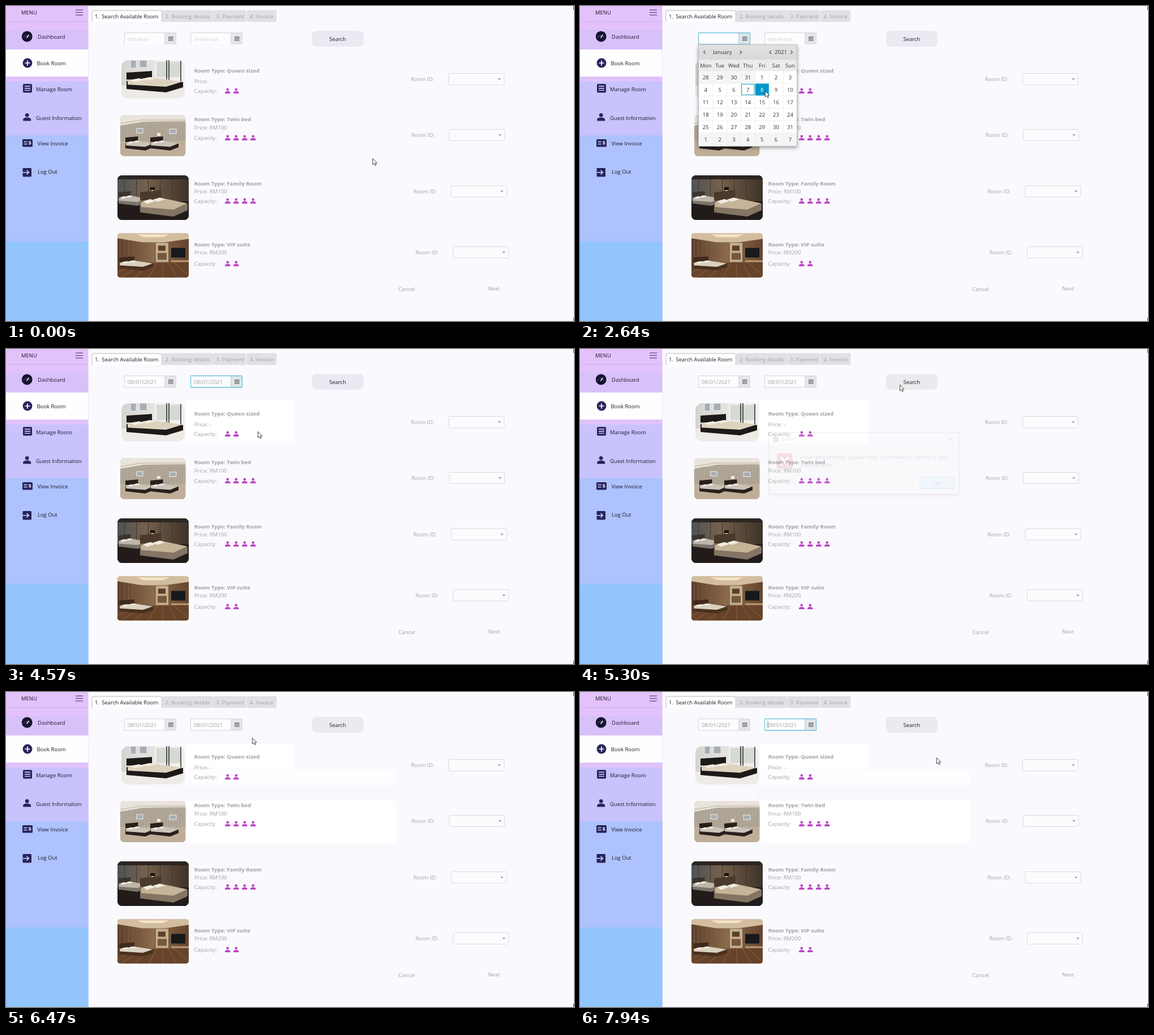
An HTML page for the animation above (8000 ms loop, 1004 by 558 pixels).

```html
<!DOCTYPE html>
<html lang="en">
<head>
<meta charset="utf-8">
<title>Room booking</title>
<style>
html, body { margin: 0; width: 100%; height: 100%; overflow: hidden; background: #fafafe; }
svg { display: block; width: 1004px; height: 558px; }
text { font: 9.55px "Open Sans", "Noto Sans", sans-serif; fill: #a2a2a5; white-space: pre; }
.b { font-weight: 700; }
.dark { fill: #1d1b2c; font-size: 9.45px; }
.cal { fill: #333; text-anchor: middle; }
.mid { text-anchor: middle; }
.date { font-size: 9.75px; }
.hint { fill: #cfcfd4; }
</style>
</head>
<body>
<svg id="stage" viewBox="0 0 1004 558">
  <defs>
    <linearGradient id="day"><stop stop-color="#d6d3d0"/><stop offset="1" stop-color="#f3f3f2"/></linearGradient>
    <linearGradient id="dusk"><stop stop-color="#4d535b"/><stop offset=".4" stop-color="#75604b"/><stop offset="1" stop-color="#3f3229"/></linearGradient>
    <linearGradient id="wood"><stop stop-color="#5b3f2b"/><stop offset=".5" stop-color="#8b6b4c"/><stop offset="1" stop-color="#65452d"/></linearGradient>
    <linearGradient id="head" x2="0" y2="1"><stop stop-color="#e2e2e2"/><stop offset="1" stop-color="#d8d8d8"/></linearGradient>
    <linearGradient id="okFill" x2="0" y2="1"><stop stop-color="#cdeaf5"/><stop offset="1" stop-color="#a5d8ea"/></linearGradient>
    <filter id="shade" x="-10%" y="-10%" width="120%" height="125%">
      <feDropShadow dx="0" dy="3" stdDeviation="3.200" flood-opacity=".36"/>
    </filter>
    <g id="person"><circle cy="-2.600" r="2.300"/><path d="M-4.800 4.500V3C-4.800 .8 -1.500 .4 0 .4S4.800 .8 4.800 3V4.500Z"/></g>
  </defs>
</svg>
<script>
const stage = document.getElementById('stage');
const R = (x, y, w, h, fill, more = '') => `<rect x="${x}" y="${y}" width="${w}" height="${h}" fill="${fill}" ${more}/>`;
const T = (x, y, s, cls = '', more = '') => `<text x="${x}" y="${y}" class="${cls}" ${more}>${s}</text>`;
const D = (d, stroke, w = 1, more = '') => `<path d="${d}" fill="none" stroke="${stroke}" stroke-width="${w}" ${more}/>`;
const F = (d, fill) => `<path d="${d}" fill="${fill}"/>`;
const G = (id, body) => `<g id="${id}">${body}</g>`;
const range = n => [...Array(n).keys()];
const repeat = (n, draw) => range(n).map(draw).join('');

function sidebar() {
  const ink = '#28245c';
  const bands = [[0, '#e3c2fc'], [42, '#d8c0f9'], [77, '#fefeff'], [125, '#e0c3fb'], [134, '#c8c2fd'], [229, '#aec2fd'], [417, '#93c5fd']];
  const items = [[56, 58, 'Dashboard'], [54.5, 104.5, 'Book Room'], [53, 150.5, 'Manage Room'],
    [53, 201.5, 'Guest Information'], [55.5, 246.5, 'View Invoice'], [56, 297, 'Log Out']];
  return bands.map(([y, c]) => R(0, y, 145.5, 558 - y, c)).join('')
    + R(0, 27, 145.5, 1, '#cdb0e6')
    + T(27, 15, 'MENU', 'dark')
    + repeat(3, i => R(123, 6.4 + i * 4.5, 13, 1.2, '#51446f'))
    + items.map(([x, y, s]) => T(x, y, s, 'dark')).join('')
    + `<circle cx="37.200" cy="54" r="9.400" fill="#14122f"/>`
    + D('M31.500 56A6 6 0 0 1 42.800 56', '#e6daf8', 1, 'stroke-dasharray="1.200 1.800"')
    + D('M36.500 56.500L40.500 51', '#fff', 1.4)
    + `<circle cx="38" cy="101" r="8.400" fill="${ink}"/>` + D('M33.500 101H42.500M38 96.500V105.500', '#fff', 1.7)
    + R(30, 138, 16, 15.5, ink, 'rx="2"') + D('M33 142H43M33 145.700H43M33 149.400H43', '#e4dcff', 1.4)
    + `<use href="#person" transform="translate(37.200 197) scale(1.450)" fill="${ink}"/>`
    + R(29, 236, 18, 13.5, ink, 'rx="1.500"') + D('M31.500 240.500H37.500M31.500 244.500H37.500', '#cdd6ff', 1.5)
    + T(42.3, 246.3, '$', 'mid b', 'style="fill:#dfe4ff"')
    + R(29.5, 287, 15.5, 15.5, ink, 'rx="1.500"') + D('M29.500 294.700H40M36.500 291L40.300 294.700L36.500 298.500', '#c9d5ff', 1.6);
}

function tabs() {
  const idle = [[277, 88, '2. Booking details'], [366.5, 57.5, '3. Payment'], [426, 51.5, '4. Invoice']];
  return idle.map(([x, w, s]) => R(x, 8, w, 19.5, '#e1e1e5', 'stroke="#d5d5d9" stroke-width=".7" rx="1.500"') + T(x + 4.8, 21.5, s)).join('')
    + `<path d="M152 28V10Q152 8 154 8H273.500Q275.500 8 275.500 10V28" fill="#fff" stroke="#b9b9bd"/>`
    + T(157, 21.5, '1.', 'dark') + T(169.3, 21.5, 'Search Available Room', 'dark');
}

// One bed shape, headboard at the left, reused in every room picture
const bed = (x, y, sx, sy, frame, sheet, head = frame) => `<g transform="translate(${x} ${y}) scale(${sx} ${sy})">`
  + F('M0 4L45 0V20H0Z', head) + F('M0 24L45 16L100 26V38L70 50L0 42Z', frame)
  + F('M2 23L45 15L99 25L70 37L2 32Z', sheet)
  + F('M6 21L22 17L32 21L14 26ZM27 18L42 14L52 18L36 22Z', '#f1ebe0') + '</g>';
const framed = (x, y, w, h) => R(x, y, w, h, '#a7adb6', 'stroke="#f4f2ee"');

const queen = (w, h) => R(0, 0, w, h, 'url(#day)') + R(0, 45, w, h, '#eeeae5')
  + R(59, 0, 53, 44, '#eff0ee') + R(62, 3, 42, 27, '#d5dad2')
  + framed(16, 0, 10, 14) + framed(32, 0, 13, 13)
  + D('M80 0V34M84 0V35M105 0V40', '#2b2626', 1.5)
  + bed(9, 19, 1, .76, '#1c1918', '#ddd2bd');

const twin = (w, h) => R(0, 0, w, h, '#b0a799') + repeat(24, i => R(i * 5, 16, 1, 30, '#a69c8d'))
  + F(`M0 0H${w}V11L40 12L0 19Z`, '#e9e4db') + D(`M0 15L38 9H${w}`, '#cabfad', 1.5)
  + R(0, 46, w, h, '#bfae97') + framed(29, 24, 11, 8) + framed(87, 25, 12, 8)
  + R(65, 32, 6, 5, '#f5ead0') + R(64, 40, 8, 11, '#3c2920')
  + [9, 53].map(x => bed(x, 38, .5, .5, '#2a1f1c', '#c9c3ba')).join('');

const family = (w, h) => R(0, 0, w, h, 'url(#dusk)') + repeat(6, i => R(12 + i * 21, 0, 1, 40, '#40352b'))
  + R(0, 0, w, 7, '#2c2521') + R(0, 46, w, h, '#211c1a')
  + bed(2, 28, .48, .52, '#7c746a', '#bfb6a9', '#3a342f')
  + R(58, 21, 8, 5, '#17120f') + R(60, 26, 4, 3, '#ffda91')
  + bed(40, 26, .84, .94, '#837463', '#c6b498', '#4a3a2c');

const suite = (w, h) => R(0, 0, w, h, 'url(#wood)') + repeat(7, i => R(4 + i * 7.5, 13, 1, 30, '#7d5b3f'))
  + F(`M0 0H${w}V10L84 16H44L0 9Z`, '#d2bd9e') + F('M34 2H92L80 7H46Z', '#f3e4c6')
  + R(68, 17, 22, 34, '#c3ae90') + R(72, 22, 13, 9, '#5a4029') + R(71, 35, 16, 12, '#76573b')
  + R(95, 26, 25, 17, '#17191b') + R(0, 52, w, h, '#66432a')
  + repeat(7, i => D(`M${i * 25 - 20} ${h}L${40 + i * 10} 52`, '#855b39', 1.2))
  + R(95, 48, 31, 3, '#bd9c73') + bed(3, 41, .6, .5, '#49301f', '#dbd1c0', '#3f2a1d');

const rooms = [
  { name: 'Queen sized', price: '-', lines: [118, 136.5, 154], guests: 2, combo: [782, 119], box: [204, 96, 112, 67.5, 12], draw: queen },
  { name: 'Twin bed', price: 'RM100', lines: [204, 218.8, 237], guests: 4, combo: [783, 218], box: [202, 193, 115.5, 73, 7], draw: twin },
  { name: 'Family Room', price: 'RM100', lines: [317.5, 332, 349], guests: 4, combo: [786.5, 318], box: [197, 300, 126, 79, 8], draw: family },
  { name: 'VIP suite', price: 'RM200', lines: [425.5, 440, 460], guests: 2, combo: [790, 426], box: [197, 402.5, 126, 78.5, 5], draw: suite }];

function roomRow({ name, price, lines: [y1, y2, y3], guests, combo: [cx, cy], box: [x, y, w, h, r], draw }, i) {
  return `<clipPath id="clip${i}">${R(0, 0, w, h, '#fff', `rx="${r}"`)}</clipPath>`
    + `<g transform="translate(${x} ${y})" clip-path="url(#clip${i})">${draw(w, h)}</g>`
    + T(332.7, y1, 'Room Type: ' + name, 'b') + T(332.7, y2, 'Price: ' + price) + T(332.5, y3, 'Capacity:')
    + repeat(guests, k => `<use href="#person" x="${391.8 + 15 * k}" y="${y3 - 3.5}" fill="#be45c6"/>`)
    + T(cx - 66.3, cy + 14.3, 'Room ID:')
    + R(cx + .5, cy + .5, 98, 20, '#fcfcff', 'stroke="#dadade" rx="2"')
    + F(`M${cx + 87} ${cy + 9}h6l-3 3.500Z`, '#aaaaae');
}

function picker(n, x, hint) {
  const icon = R(x + 78, 54, 8.5, 8, '#88888c') + D(`M${x + 78} 56.500h8.500M${x + 78} 59.300h8.500M${x + 81} 56v6M${x + 84} 56v6`, '#d5d5d8', .6);
  return R(x + .5, 47.5, 71, 20.5, '#fdfdff')
    + D(`M${x + .5} 68V47.500h90.500`, '#d5d5d9')
    + G('base' + n, D(`M${x + .5} 68h90.500`, '#d5d5d9'))
    + R(x + 71.5, 47.5, 20, 20, '#e6e6e9', `id="btn${n}" stroke="#d8d8dc" stroke-width=".8"`)
    + icon
    + G('focus' + n, R(x + .5, 47.5, 91, 20.5, 'none', 'rx="1" stroke="#72c4df" stroke-width="1.300"') + D(`M${x + 71.5} 48v19.500`, '#b9cdd5'))
    + T(x + 5.7, 61.7, hint, 'hint', `id="text${n}"`)
    + G('caret' + n, R(x + 5.6, 51, 1, 13, '#777'));
}

// Calendar drawn for the check-in field; moved right for check-out
const CELL = 24.85, ROW = 22, X0 = 210, Y0 = 115;
const cellX = c => X0 + c * CELL, cellY = r => Y0 + r * ROW;
function calendar() {
  const cells = range(42).map(i => ({ c: i % 7, r: i / 7 | 0, out: i < 4 || i > 34, day: (i + 27) % 31 + 1 }));
  const arrow = (x, d) => D(`M${x - d * 1.5} 79l${d * 3} 3l${-d * 3} 3`, '#555', 1.1);
  return R(209, 68, 175, 180.5, '#efefef', 'filter="url(#shade)"')
    + R(209, 68, 175, 27, 'url(#head)') + R(209, 95, 175, 20, '#ebebeb')
    + arrow(220, -1) + arrow(284, 1) + arrow(336.5, -1) + arrow(374, 1)
    + T(252, 85.3, 'January', 'cal') + T(355, 85.3, '2021', 'cal')
    + 'Mon Tue Wed Thu Fri Sat Sun'.split(' ').map((d, i) => T(cellX(i) + 12.3, 109, d, 'cal')).join('')
    + cells.map(({ c, r, out }) => R(cellX(c) + .5, cellY(r) + .5, CELL - 1, ROW - 1, out ? '#f5f5f5' : '#fff')).join('')
    + R(0, 0, CELL - 1, ROW - 1, '#cfe6f4', 'id="hover"')
    + R(cellX(3) + 1, cellY(1) + 1.5, CELL - 2.2, ROW - 3, 'none', 'stroke="#4fb4d6" stroke-width="1.500"')
    + cells.map(({ c, r, day }) => T(cellX(c) + 12.3, cellY(r) + 14.5, day, 'cal')).join('')
    + G('picked', R(.5, .5, CELL - 1, ROW - 1, '#0096c9') + T(12.3, 14.5, '8', 'mid', 'id="pickedDay" style="fill:#fff"'))
    + R(209.5, 68.5, 174, 180, 'none', 'stroke="#bdbdbd"');
}

function dialog() {
  return R(326.5, 145.5, 351, 114, '#f4f4f4', 'filter="url(#shade)"')
    + R(326.5, 145.5, 351, 26, '#fff')
    + R(334, 153.5, 10, 9.5, '#555') + T(349.5, 161.5, 'Error', '', 'style="fill:#222"')
    + D('M659 154.500l8 7.500M667 154.500l-8 7.500', '#333')
    + R(341, 184, 29, 29, '#d23b35', 'rx="4"') + D('M348 191l15 15M363 191l-15 15', '#fff', 4)
    + T(384, 194.8, 'Invlid date entered, please make sure checkout date is at least', '', 'style="fill:#333"')
    + T(384, 209.5, 'one day later', '', 'style="fill:#333"')
    + R(605.5, 228.5, 63, 21, 'url(#okFill)', 'rx="2" stroke="#3fa9cc" stroke-width="1.300"')
    + T(637, 242.5, 'OK', 'mid', 'style="fill:#333"')
    + R(326.5, 145.5, 351, 114, 'none', 'stroke="#777"');
}

stage.innerHTML += R(0, 0, 1004, 558, '#fafafe')
  + G('haze1', R(318, 69, 191, 22, '#f8f8fd', 'rx="3"') + R(318, 91, 191, 75.5, '#fff'))
  + G('haze2', R(316.5, 135.5, 374, 136, '#fdfdff', 'rx="11" stroke="#f6f6f9"') + R(317, 166.5, 373, 26, '#f8f8fd') + R(318, 192.5, 372, 75, '#fff', 'rx="4"'))
  + sidebar() + tabs()
  + R(1003, 0, 1, 7, '#444') + R(1003, 552, 1, 6, '#444')
  + picker(1, 209, 'check-in') + picker(2, 326, 'check-out')
  + R(540.5, 44, 91.5, 28, '#e9eaf2', 'id="search" rx="8"') + T(586.3, 61.7, 'Search', 'dark mid')
  + rooms.map(roomRow).join('') + T(693.5, 505, 'Cancel') + T(852.3, 504.3, 'Next')
  + G('calendar', calendar()) + G('dialog', dialog())
  + G('cursor', '<path d="M0 0V10.700L2.500 8.500L4.200 12.300L5.900 11.500L4.300 7.800H7.600Z" fill="#fff" stroke="#333" stroke-width=".9" stroke-linejoin="round"/>');

const $ = id => document.getElementById(id);
const show = (id, on) => $(id).style.display = on ? '' : 'none';
const within = (t, ...spans) => spans.some(([a, b]) => t >= a && t < b);
const ramp = (t, a, b) => Math.min(1, Math.max(0, (t - a) / (b - a)));
const ease = u => u * u * (3 - 2 * u);

const LOOP = 8000, TICK = 78;
// Moments of the story, in ms
const OPEN_IN = 1370, FOCUS_IN = 1440, PRESS_IN = 2640, SET_IN = 2790;
const OPEN_OUT = 3650, PRESS_OUT = 4340, SET_OUT = 4420, SEARCH = 5200;
const REOPEN = 6940, PRESS_NEW = 7460, SET_NEW = 7550;

// Each move of the pointer: start, end, place reached
const home = [648, 270];
const moves = [
  [0, 820, 280, 57], [990, 1080, 289, 57], [OPEN_IN, 2090, 300, 167], [2210, 2400, 327, 150],
  [SET_IN, 3180, 404, 57], [3410, OPEN_OUT, 406, 61], [3880, 4240, 440, 150], [SET_OUT, 5060, 565, 63],
  [5300, 5850, 631, 237], [6000, 6470, 435, 81], [6470, 6770, 406, 60], [7090, 7400, 463, 149],
  [SET_NEW, 7870, 629, 121], [7870, 7940, 630, 116]];

function pointer(t) {
  let [x, y] = home;
  for (const [a, b, tx, ty] of moves) {
    const steps = Math.round((b - a) / TICK);
    const u = ease(Math.floor(ramp(t, a, b) * steps) / steps);
    x += (tx - x) * u;
    y += (ty - y) * u;
  }
  return [Math.round(x), Math.round(y)];
}

function setField(n, value, hint) {
  const el = $('text' + n);
  el.textContent = value ?? hint;
  el.setAttribute('class', value === null ? 'hint' : 'date');
}

function drawFields(t) {
  const focus1 = within(t, [FOCUS_IN, OPEN_OUT]), focus2 = within(t, [OPEN_OUT, SEARCH], [REOPEN, LOOP]);
  setField(1, t < FOCUS_IN ? null : t < SET_IN ? '' : '08/01/2021', 'check-in');
  setField(2, t < OPEN_OUT ? null : t < SET_OUT ? '' : t < SET_NEW ? '08/01/2021' : '09/01/2021', 'check-out');
  show('base1', t >= SET_IN);
  show('base2', t >= OPEN_OUT);
  show('focus1', focus1);
  show('focus2', focus2);
  // Carets blink once a second from the moment of focus
  const blink = since => (t - since) % 1000 < 500;
  show('caret1', within(t, [FOCUS_IN, PRESS_IN]) && blink(FOCUS_IN));
  show('caret2', focus2 && blink(t < REOPEN ? OPEN_OUT : REOPEN) || t >= 7940);
  $('btn1').setAttribute('fill', within(t, [1080, FOCUS_IN]) ? '#d0d0d3' : focus1 ? '#dde5e9' : '#e6e6e9');
  $('btn2').setAttribute('fill', within(t, [3500, 3880], [REOPEN, 7090]) ? '#c8d3d9' : focus2 ? '#dde5e9' : '#e6e6e9');
  $('search').setAttribute('fill', t < SEARCH ? '#e9eaf2' : '#ebebee');
}

function drawCalendar(t, x, y) {
  const forOut = within(t, [OPEN_OUT, SET_OUT], [REOPEN, SET_NEW]);
  const shift = forOut ? 117 : 0;
  show('calendar', forOut || within(t, [OPEN_IN, SET_IN]));
  $('calendar').setAttribute('transform', `translate(${shift} 0)`);
  const col = Math.floor((x - shift - X0) / CELL), row = Math.floor((y - Y0) / ROW);
  show('hover', col >= 0 && col < 7 && row >= 0 && row < 6);
  $('hover').setAttribute('x', cellX(col) + .5);
  $('hover').setAttribute('y', cellY(row) + .5);
  const day = t < PRESS_NEW ? 8 : 9;
  show('picked', within(t, [PRESS_IN, SET_IN], [PRESS_OUT, SET_OUT], [REOPEN, SET_NEW]));
  $('picked').setAttribute('transform', `translate(${cellX(day - 4)} ${cellY(1)})`);
  $('pickedDay').textContent = day;
}

function drawDialog(t) {
  const alpha = ramp(t, 5280, 5440) * (1 - ramp(t, 6000, 6150));
  show('dialog', alpha > 0);
  $('dialog').setAttribute('opacity', alpha);
  $('dialog').setAttribute('transform', `translate(502 202.500) scale(${.95 + .05 * alpha}) translate(-502 -202.500)`);
  show('haze1', t >= SET_OUT);
  show('haze2', t >= 5380);
}

function render(t) {
  const [x, y] = pointer(t);
  $('cursor').setAttribute('transform', `translate(${x + .4} ${y + .4})`);
  drawFields(t);
  drawCalendar(t, x, y);
  drawDialog(t);
}

const start = performance.now();
function loop() {
  render((performance.now() - start) % LOOP);
  requestAnimationFrame(loop);
}
loop();
</script>
</body>
</html>
```
